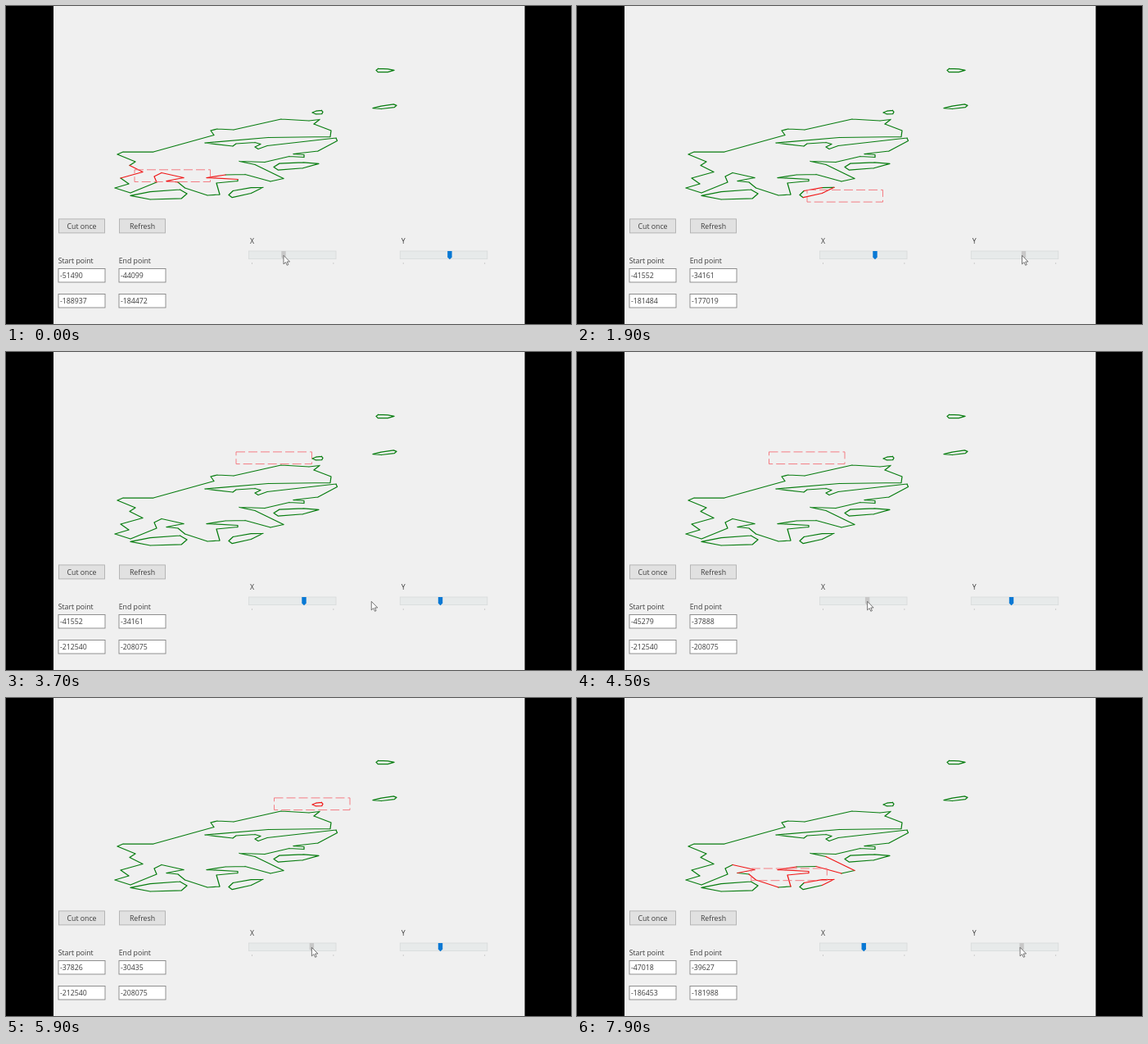
An HTML page that plays this animation: 690x388 px, repeating every 8 s.

```html
<!DOCTYPE html>
<html lang="en">
<head>
<meta charset="utf-8">
<title>Polyline cut</title>
<style>
  html, body { margin: 0; width: 100%; height: 100%; overflow: hidden; background: #000; }
  svg { display: block; width: 100vw; height: 100vh; }
  text { font: 8.75px "Open Sans", "Noto Sans", sans-serif; fill: #3c3c3c; }
  .line { fill: none; stroke-width: 1.25; stroke-linejoin: round; stroke-linecap: round; }
</style>
</head>
<body>
<svg id="stage" viewBox="0 0 690 388"></svg>
<script>
const LOOP = 8000, STEP = 100, GLIDE = 400;
const CUT_WIDTH = 92.5, CUT_HEIGHT = 14.7;
const stage = document.getElementById("stage");

function add(tag, attrs, content = "") {
  const node = document.createElementNS("http://www.w3.org/2000/svg", tag);
  for (const key in attrs) node.setAttribute(key, attrs[key]);
  node.textContent = content;
  return stage.appendChild(node);
}
const box = (x, y, width, height, fill, stroke = "none") =>
  add("rect", { x, y, width, height, fill, stroke, "stroke-width": 0.9 });
const label = (x, y, content, anchor = "start") =>
  add("text", { x, y, "text-anchor": anchor }, content);
const mix = (a, b, k) => a + (b - a) * k;

// Mainland corners; the islets share one blunt wedge, scaled, mirrored and tilted
const mainland = `136,181 143,178 180,178 254,157.5 250,152 258,150 278,151 336,138 370,140
  383,138.5 376,144 397,152 396,159.5 320,160.5 243,167 277,171 281,168 304,166.5 311,168.5
  304,172 308,174.5 319,170.5 403,161 404.5,164.5 381,177 351,180.5 364,181.5 364,184.5
  346,183.5 316,190.5 285,189.5 304,193.5 339,210.5 323,214 292,205.5 268,206 245,209.5
  283,211.5 283,213.5 257,216 261,230 246,231 218.5,222 210,215 196,213.5 217,209.5
  190,203.5 181,208 184,215 152,228 133,222 150,217 140,210 167,202.5 151,194.5 158,190`
  .split(/\s+/).map(pair => pair.split(",").map(Number));
const wedge = [[-1, 0], [-0.75, -1], [0.3, -0.9], [1, -0.3], [0.3, 0.8], [-0.8, 1]];
const islet = (cx, cy, rx, ry, tilt) =>
  wedge.map(([u, v]) => [cx + u * rx, cy + v * ry + u * tilt]);
const outlines = [
  mainland,
  islet(186.5, 231, -34.5, 5.5, 2),
  islet(293, 226.5, 21, 4, -4),
  islet(354.5, 195, 27.5, 4, -1.5),
  islet(380.5, 130, -6.5, 2.2, 0.7),
  islet(463, 78.7, 11, 2.2, 0.3),
  islet(462.5, 123.3, -14.5, 2, 2)
];
const segments = outlines.flatMap(points =>
  points.map((p, i) => [p, points[(i + 1) % points.length]]));

box(58, 0, 575.5, 388, "#f0f0f0");
const greenPath = add("path", { class: "line", stroke: "#087d10" });
const redPath = add("path", { class: "line", stroke: "#f01818" });
const cutBox = add("rect", {
  width: CUT_WIDTH, height: CUT_HEIGHT, fill: "none", stroke: "#f47078",
  "stroke-width": 0.9, "stroke-dasharray": "11 4"
});

function field(x, y) {
  box(x, y, 57, 16.5, "#fff", "#858585");
  return label(x + 2, y + 11.5, "");
}
function column(x, button, caption) {
  box(x + 0.5, 259.9, 56, 17, "#e1e1e1", "#b0b0b0");
  label(x + 28.5, 271.6, button, "middle");
  label(x - 0.3, 314, caption);
  return [field(x, 320.5), field(x, 351.5)];
}
const startFields = column(64, "Cut once", "Start point");
const endFields = column(138, "Refresh", "End point");

function slider(x, caption) {
  label(x + 1.5, 289.6, caption);
  box(x, 299, 106.5, 9.6, "#e7eaea", "#d9dcdc");
  [x + 3.5, x + 103].forEach(tick => box(tick, 313, 0.8, 2, "#c4c4c4"));
  return add("path", { d: "M-2.7 -5H2.7V2.6L0 5.2L-2.7 2.6Z" });
}

// Keys are [time, slider step]; each axis maps a step to thumb, cut box and world value
const axisX = {
  thumb: slider(296.5, "X"), thumbAt: n => 339 + 0.625 * n, grip: 0,
  edgeAt: n => 157 + 3.1 * n, valueAt: n => Math.round(-51490 + 248.44 * n), span: 7391,
  keys: [[0, 0], [600, 40], [4000, 40], [4500, 25], [4700, 25], [5200, 62], [5400, 92], [6400, 18]]
};
const axisY = {
  thumb: slider(481.3, "Y"), thumbAt: n => 541.9 + 0.6 * n, grip: -2,
  edgeAt: n => 199.8 + 4.1 * n, valueAt: n => Math.round(-188937 + 1242.24 * n), span: 4465,
  keys: [[1300, 0], [1700, 16], [1800, 16], [1900, 6], [2700, -20], [2800, -14], [3100, -30],
    [3400, -19], [7000, -19], [7900, 2]]
};
const axes = [axisX, axisY];

// After each drag the cursor glides in an arc to the next slider
const drags = [
  { axis: axisX, from: 0, to: 600, lift: -6 },
  { axis: axisY, from: 1400, to: 3500, lift: 0 },
  { axis: axisX, from: 4100, to: 6500, lift: 12 },
  { axis: axisY, from: 7100, to: LOOP, lift: 0 }
];
const cursor = add("path", {
  d: "M0 0V10.6L2.5 8.3L4.2 12L5.8 11.3L4.2 7.7H7.5Z",
  fill: "#fff", stroke: "#555", "stroke-width": 0.8
});

function stepAt(keys, t) {
  const i = keys.findIndex(key => key[0] > t);
  if (i < 0) return keys[keys.length - 1][1];
  if (i === 0) return keys[0][1];
  const [t0, n0] = keys[i - 1], [t1, n1] = keys[i];
  return Math.round(mix(n0, n1, (t - t0) / (t1 - t0)));
}
const pathOf = list => list.map(([a, b]) => `M${a}L${b}`).join("");

// A segment is marked when its bounding box meets the cut box
function markSegments(left, top) {
  const meets = (a, b, low, size) => Math.max(a, b) >= low && Math.min(a, b) <= low + size;
  const hit = ([a, b]) =>
    meets(a[0], b[0], left, CUT_WIDTH) && meets(a[1], b[1], top, CUT_HEIGHT);
  redPath.setAttribute("d", pathOf(segments.filter(hit)));
  greenPath.setAttribute("d", pathOf(segments.filter(s => !hit(s))));
  cutBox.setAttribute("x", left);
  cutBox.setAttribute("y", top);
}

function draw(t) {
  const index = drags.findLastIndex(d => d.from <= t);
  const drag = drags[index], next = drags[index + 1] || drag;
  const steps = axes.map(axis => stepAt(axis.keys, t));

  axes.forEach((axis, i) => {
    const value = axis.valueAt(steps[i]);
    startFields[i].textContent = value;
    endFields[i].textContent = value + axis.span;
    axis.thumb.setAttribute("transform", `translate(${axis.thumbAt(steps[i])} 304)`);
    axis.thumb.setAttribute("fill", axis === drag.axis && t <= drag.to ? "#c8c8c8" : "#0878d4");
  });
  markSegments(axisX.edgeAt(steps[0]), axisY.edgeAt(steps[1]));

  const handX = axis => axis.thumbAt(steps[axes.indexOf(axis)]) + axis.grip;
  const k = Math.min(1, Math.max(0, (t - drag.to) / GLIDE));
  const x = mix(handX(drag.axis), handX(next.axis), k);
  const y = 304.3 - drag.lift * Math.sin(Math.PI * k);
  cursor.setAttribute("transform", `translate(${x} ${y})`);
}

const begin = performance.now();
function tick() {
  const t = (performance.now() - begin) % LOOP;
  draw(Math.floor(t / STEP) * STEP);
  requestAnimationFrame(tick);
}
tick();
</script>
</body>
</html>
```
